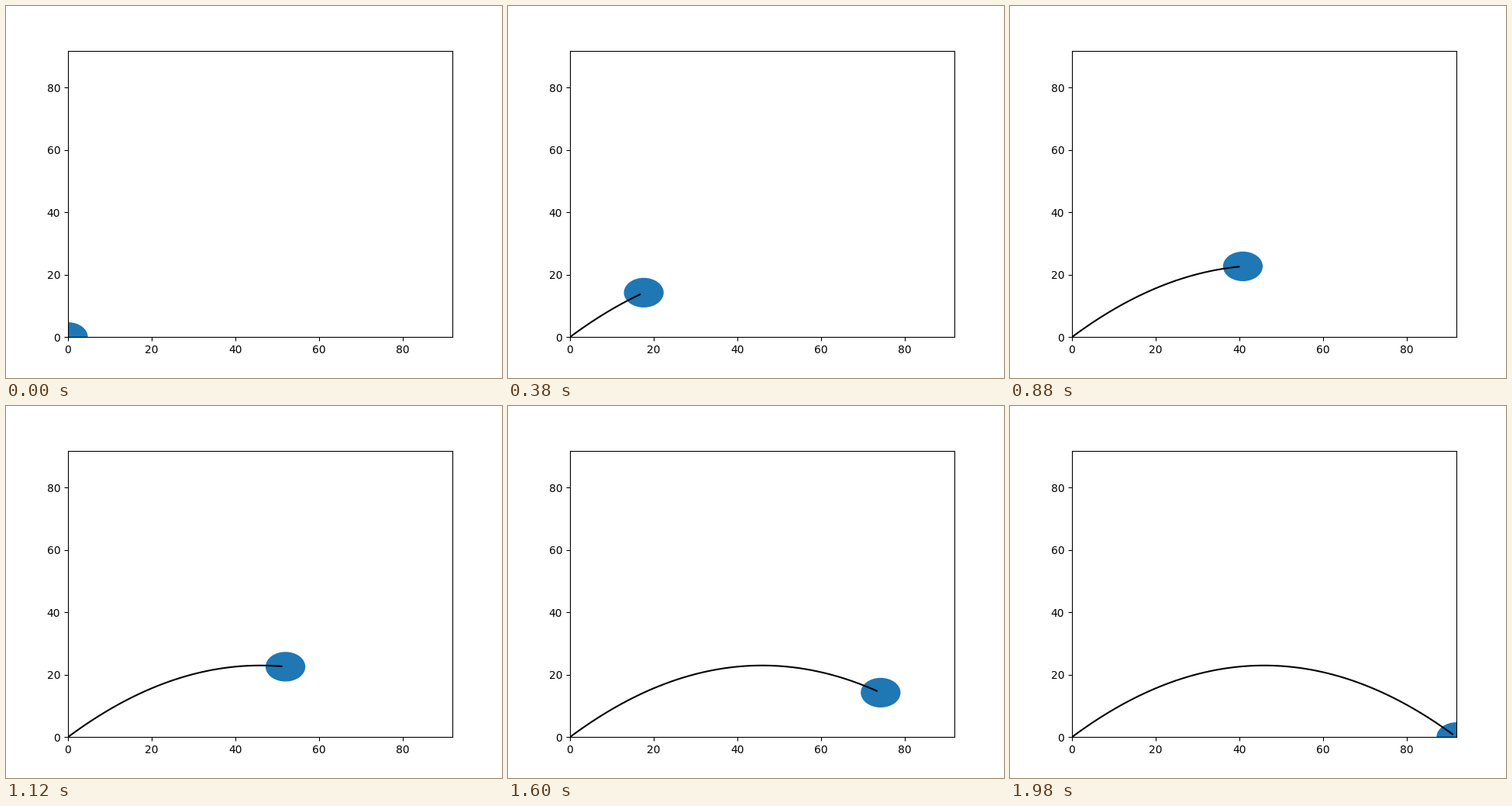
These frames come from a looping animation (640 px wide and 480 px high, 2000 ms). A matplotlib script:

```python
import matplotlib.pyplot as plt
import numpy as np
from matplotlib.animation import FuncAnimation
from matplotlib.patches import Circle

SPEED, ANGLE, GRAVITY = 30, np.pi / 4, 9.8
FRAMES, INTERVAL = 100, 20

# Projectile path from launch to landing
flight = 2 * SPEED * np.sin(ANGLE) / GRAVITY
t = np.linspace(0, flight, FRAMES)
x = SPEED * np.cos(ANGLE) * t
y = SPEED * np.sin(ANGLE) * t - GRAVITY * t**2 / 2
reach = x[-1]

fig, ax = plt.subplots(figsize=(6.4, 4.8), dpi=100)
ax.set_xlim(0, reach)
ax.set_ylim(0, reach)

ball = ax.add_patch(Circle((0, 0), 4.75, facecolor="tab:blue"))
trail, = ax.plot([], [], color="black", lw=1.5)


def update(i):
    # The trail stops one step behind the ball
    ball.center = x[i], y[i]
    trail.set_data(x[:i], y[:i])
    return ball, trail


anim = FuncAnimation(fig, update, frames=FRAMES, interval=INTERVAL,
                     repeat=True, repeat_delay=0)
plt.show()
```
